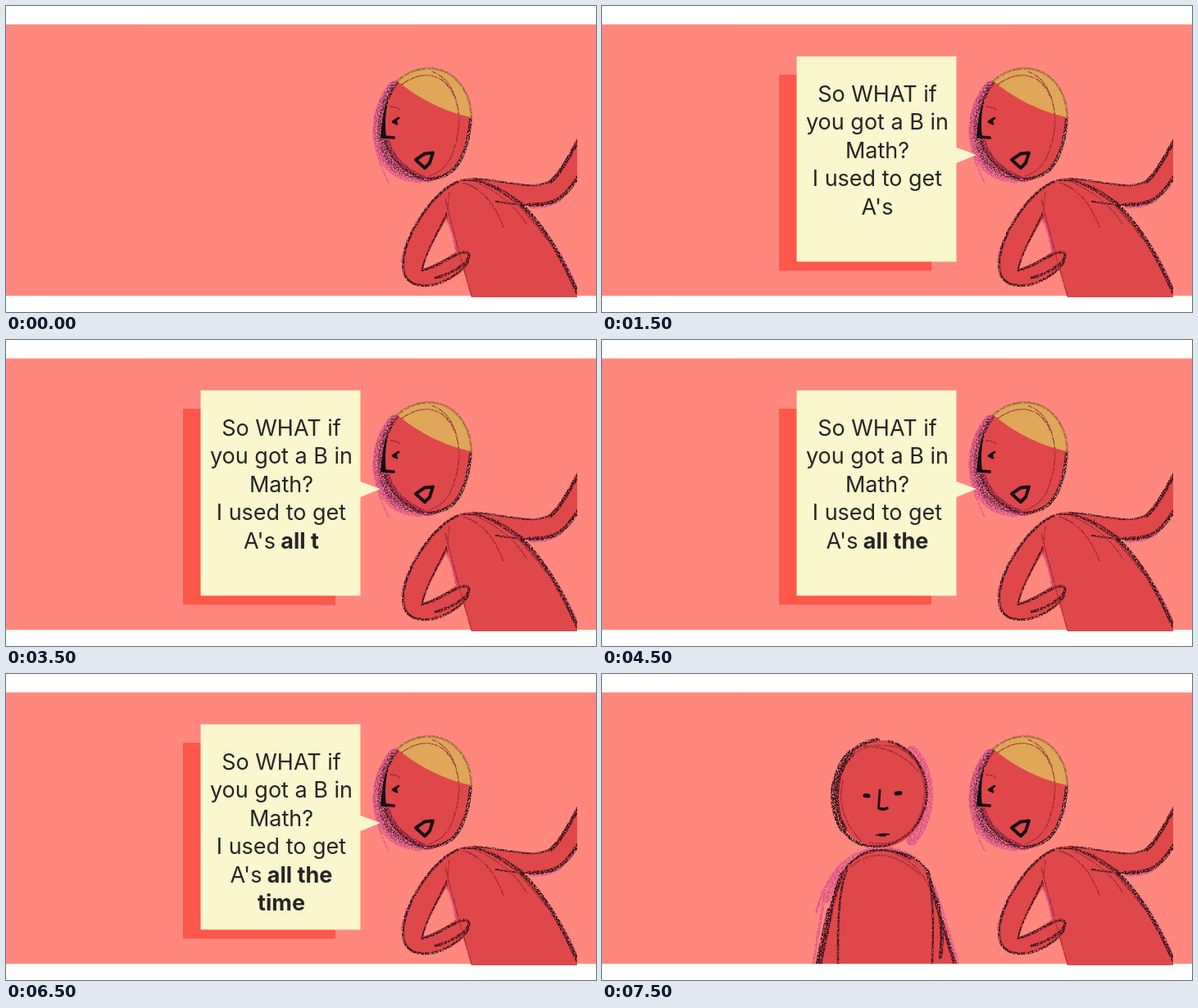
Recreate the animation shown at these times as an HTML page. Size 720 by 374 pixels, loop 8000 ms.

```html
<!DOCTYPE html>
<html lang="en">
<head>
<meta charset="utf-8">
<style>
  html, body { margin: 0; width: 100%; height: 100%; overflow: hidden; background: #fff; }
  svg { display: block; width: 720px; height: 374px; }
  text { font: 27px Inter, "Liberation Sans", sans-serif; fill: #252525; text-anchor: middle; white-space: pre; }
  .bold { font-weight: 700; }
  .skin { fill: #e0474b; }
  .line { fill: none; stroke: #170d12; stroke-linecap: round; stroke-linejoin: round; }
  .chalk { fill: none; stroke: #2a101a; stroke-linecap: round; filter: url(#grain); }
  .faint { stroke: #8e2638; stroke-width: 1.3; }
  .pink { stroke: #d9508a; }
</style>
</head>
<body>
<svg viewBox="0 0 720 374">
  <defs>
    <filter id="grain" filterUnits="userSpaceOnUse" x="0" y="0" width="720" height="374" color-interpolation-filters="sRGB">
      <feTurbulence type="fractalNoise" baseFrequency=".6" numOctaves="2" seed="4"/>
      <feColorMatrix values="0 0 0 0 0  0 0 0 0 0  0 0 0 0 0  4 0 0 0 -1.3" result="holes"/>
      <feComposite in="SourceGraphic" in2="holes" operator="in"/>
      <feGaussianBlur stdDeviation=".35"/>
    </filter>
    <clipPath id="page"><path d="M0 0H697V356H0Z"/></clipPath>
    <clipPath id="band"><path d="M0 0H720V354.3H0Z"/></clipPath>
  </defs>

  <path fill="#ff877e" d="M0 22.6H720V354.3H0Z"/>
  <path stroke="#f3c4c0" stroke-width=".6" d="M166 22.3H496"/>

  <!-- speaker's body -->
  <g clip-path="url(#page)">
    <path class="skin" fill-rule="evenodd" d="M551 214C520 228 489 275 485 310C482 338 497 345 520 341C535 338 549 331 558 322L568 356H697V348C684 318 664 279 630 243C672 249 683 231 697 211V163C688 179 677 200 665 213C650 224 620 217 571 210Q560 210 551 214Z
      M538 260C525 282 513 303 508 322Q533 313 549 300Q546 278 538 260Z"/>
    <g class="chalk">
      <path class="pink" stroke-width="2.5" d="M546 218C518 233 488 277 483 312M538 260Q546 280 549 298M640 246C677 248 684 228 698 211M697 163Q680 199 667 211M648 262Q682 306 698 348"/>
      <path stroke-width="3" d="M551 215C521 228 489 276 485 310C482 337 497 344 520 341C540 337 556 325 564 312"/>
      <path stroke-width="4.5" d="M698 165C687 184 676 206 664 215M698 209C682 234 672 244 638 243"/>
      <path stroke-width="4.5" d="M628 241C662 276 682 315 697 350"/>
      <path stroke-width="2.2" d="M538 253C526 279 511 304 508 322M571 211C606 212 642 227 664 214C676 204 687 181 698 165M571 211C600 222 635 244 659 277C675 302 687 328 697 349M555 213C585 210 615 229 632 244M598 239Q650 248 674 237"/>
      <path stroke-width="3.2" d="M508 323C527 319 543 305 557 301Q568 300 564 309C557 319 540 329 524 332"/>
      <path class="faint" d="M536 236Q549 288 568 354M558 216Q590 225 607 270M573 215Q616 234 636 268M541 228L538 260M600 220Q630 245 660 285"/>
    </g>
  </g>

  <!-- speaker's head -->
  <g class="chalk">
    <path stroke="#b93f82" stroke-width="15" d="M474 99C455 123 450 155 461 178C471 198 489 206 516 208"/>
    <path class="pink" stroke-width="1.6" d="M448 152Q449 181 467 216M455 184Q464 207 492 214M460 190Q472 211 506 216"/>
    <path stroke="#6a2450" stroke-width="6" d="M472 98C453 126 452 162 466 186Q478 203 505 210"/>
  </g>
  <path class="skin" d="M478 92C462 113 459 143 464 170C472 195 495 213 520 212C547 208 559 184 565 148L567 136C565 105 545 78 516 77Q492 79 478 92Z"/>
  <path fill="#dfa757" d="M478 92Q492 78 515 77C547 77 566 104 567 136Q518 125 478 92Z"/>
  <g class="chalk">
    <path stroke="#8d6b36" stroke-width="2.5" d="M477 92Q493 77 516 76C547 77 567 103 568 136"/>
    <path stroke-width="4" d="M567 138C565 165 558 188 545 201Q531 212 511 212"/>
    <path stroke="#7a2450" stroke-width="5" d="M466 166Q474 195 512 211"/>
    <path stroke-width="2.5" d="M478 94C461 114 458 144 464 171Q475 198 510 212"/>
    <path class="faint" d="M483 96Q510 76 533 91C557 112 558 151 542 187Q533 203 516 208M520 80C552 92 560 139 546 176M469 123Q476 123 481 127"/>
  </g>
  <g class="line">
    <path fill="#170d12" stroke-width="1.6" d="M464 121Q459 140 458 161L474 162V160L463 159Q461 142 464 121Z"/>
    <path stroke-width="2.8" d="M479 137L472 141.5L477 144M476 140V143"/>
    <path stroke-width="4" d="M500 188L511 180.5L521 179.5L517 192L511 198Z"/>
  </g>

  <g id="listener" clip-path="url(#band)">
    <g class="chalk">
      <path class="pink" stroke-width="13" d="M378 94C404 122 404 172 378 203"/>
      <path class="pink" stroke-width="8" d="M334 215C306 220 288 240 274 276M344 214Q380 219 392 239"/>
      <path class="pink" stroke-width="3" d="M310 220C284 234 274 252 261 292M290 238L268 268M272 268L258 354M405 258Q425 318 434 354"/>
    </g>
    <path class="skin" d="M340 81C306 81 284 111 284 148C284 185 309 212 341 212C374 211 397 181 397 144C397 108 372 81 340 81Z"/>
    <path class="skin" d="M342 214C305 216 290 241 279 282L262 354.3H433C421 324 414 296 405 264C397 233 376 216 342 214Z"/>
    <g class="chalk">
      <path stroke-width="4" d="M337 80C303 84 280 117 281 152C282 181 297 201 318 209"/>
      <path stroke-width="9" d="M304 97C282 116 278 165 295 190"/>
      <path stroke-width="3" d="M315 208C350 219 388 197 396 154C399 121 381 91 350 82"/>
      <path stroke-width="5" d="M293 244C282 272 275 305 270 325"/>
      <path stroke-width="8" d="M278 290L264 356"/>
      <path stroke-width="4.5" d="M397 240C407 281 420 318 431 356M408 275Q418 310 413 346"/>
      <path stroke-width="2.5" d="M293 244Q310 216 342 215Q380 217 397 240M299 239C287 270 288 315 288 355M398 242C406 282 404 318 403 355M315 221Q342 207 376 226"/>
      <path class="faint" d="M298 105Q324 80 362 90C402 112 400 160 378 190Q360 212 326 206M294 130Q284 170 316 204M318 88Q360 88 386 119M303 236Q342 203 388 245M360 221Q386 232 399 260"/>
    </g>
    <g class="line">
      <path stroke-width="2.8" d="M339 142L337.5 164"/>
      <path stroke-width="3.6" d="M339 164.5Q344 166 348 164"/>
      <path stroke-width="1.8" d="M335 197Q343 195 350 196M339 197.5H346"/>
      <path stroke-width="5" d="M321 148.5L325 149M359 146L364 145.5"/>
    </g>
  </g>

  <g id="bubble">
    <path fill="#ff574a" d="M216 84H402V323.5H216Z"/>
    <path fill="#faf6cd" d="M237.5 61.5H432.5V173L457 182L432.5 192V312.5H237.5Z"/>
    <g id="question">
      <text x="336" y="116.5">So WHAT if</text>
      <text x="336" y="151">you got a B in</text>
      <text x="336" y="185.5">Math?</text>
    </g>
    <g id="boast">
      <text x="336" y="220">I used to get</text>
      <text x="336" y="254.5">A's<tspan class="bold" id="typed"></tspan></text>
      <text x="336" y="289" class="bold" id="lastLine"></text>
    </g>
  </g>
</svg>
<script>
  const $ = id => document.getElementById(id);
  const STEP = 500, STEPS = 16;
  const letters = 'allthetime!';
  let shown = -1;

  const show = (id, on) => $(id).style.display = on ? '' : 'none';

  function draw(step) {
    show('bubble', step > 0 && step < 15);
    show('listener', step === 15);
    show('question', step > 1);
    show('boast', step > 2);
    // one letter per step, after a pause on the plain text
    const typed = letters.slice(0, Math.max(0, step - 3));
    const words = [typed.slice(0, 3), typed.slice(3, 6)].filter(Boolean);
    $('typed').textContent = words.map(w => ' ' + w).join('');
    $('lastLine').textContent = typed.slice(6);
  }

  function tick() {
    const step = Math.floor(performance.now() / STEP) % STEPS;
    if (step !== shown) draw(shown = step);
    requestAnimationFrame(tick);
  }
  tick();
</script>
</body>
</html>
```
